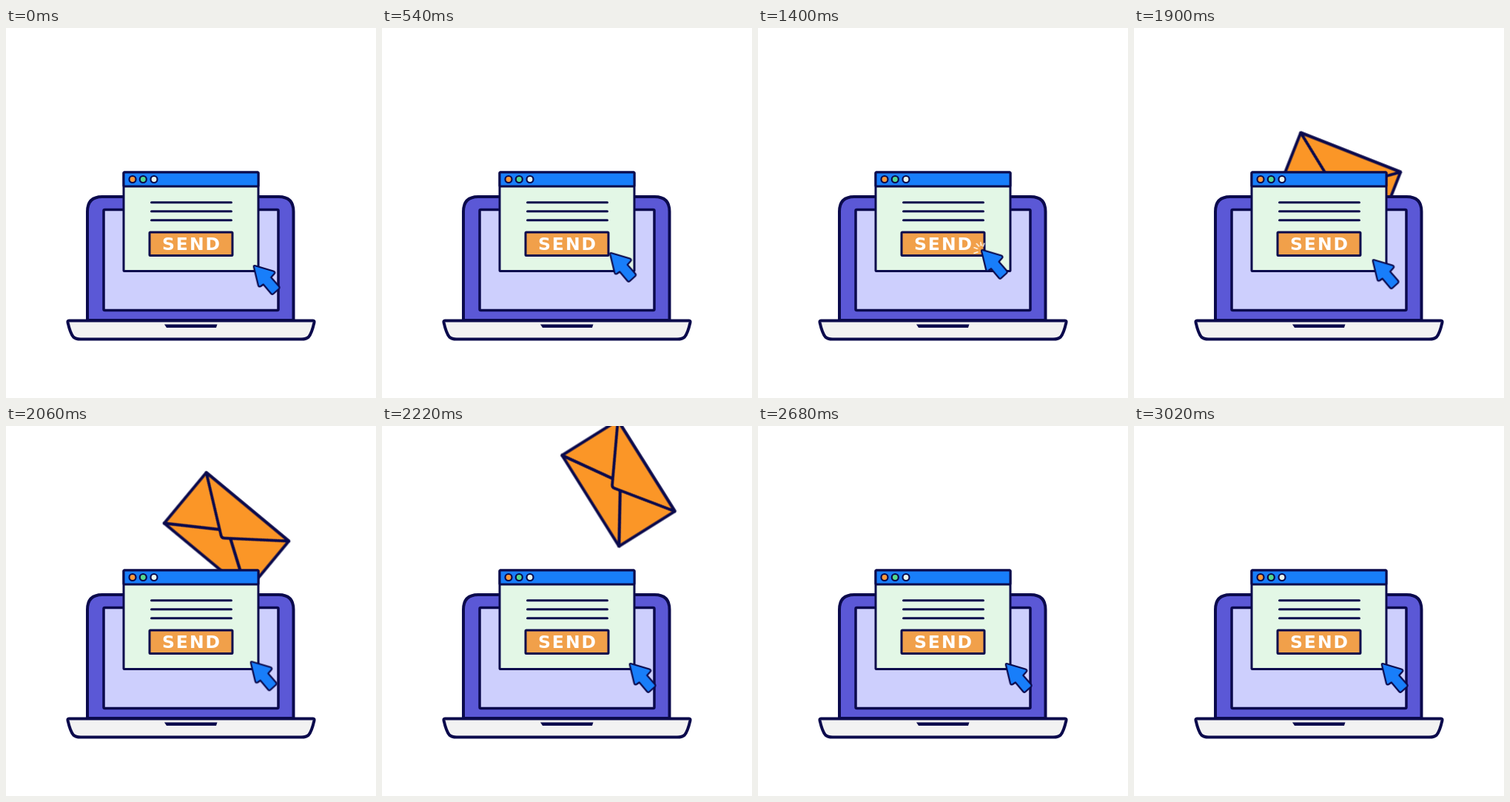
Animation of 500 by 500 pixels, one loop 3620 ms. Source, as an HTML page:

```html
<!DOCTYPE html>
<html lang="en">
<head>
<meta charset="utf-8">
<title>Send</title>
<style>
  html, body { margin: 0; width: 100%; height: 100%; overflow: hidden; background: #fff; }
  svg { display: block; width: 100%; height: 100%; }
  .line { stroke: #0b0a4c; stroke-width: 3; stroke-linejoin: round; stroke-linecap: round; }
  .thick { stroke-width: 4; }
  .thin { stroke-width: 2.2; }
  .label {
    font: 700 23.5px "DejaVu Sans", sans-serif;
    letter-spacing: 2px; fill: #fff; text-anchor: middle;
  }

  .mail, .cursor, .sparks path { animation: 3620ms linear infinite; }
  .mail { animation-name: fly; }
  .cursor { animation-name: point; }
  .sparks path {
    animation-name: burst;
    fill: none; stroke: #fffaf0; stroke-width: 1.6; stroke-dasharray: 1 3;
  }

  @keyframes fly {
    0%, 46.96% { transform: translate(249.4px, 292.5px) rotate(-1.4deg); }
    74.59%, 100% { transform: translate(384px, -120.3px) rotate(112.5deg); }
  }
  @keyframes point {
    0% { transform: translate(334.8px, 321px); animation-timing-function: cubic-bezier(.5, 0, .5, 1); }
    22.1% { transform: translate(302px, 299.8px); }
    38.67% { transform: translate(302px, 299.8px); animation-timing-function: cubic-bezier(.37, 0, .63, 1); }
    62.43%, 100% { transform: translate(334.8px, 321px); }
  }
  @keyframes burst {
    0%, 32.6% { stroke-dashoffset: 1; opacity: 0; }
    32.61% { stroke-dashoffset: 1; opacity: 1; }
    37%, 39.2% { stroke-dashoffset: 0; opacity: 1; }
    43% { stroke-dashoffset: -1; opacity: 1; }
    43.01%, 100% { stroke-dashoffset: -1; opacity: 0; }
  }
</style>
</head>
<body>
<svg viewBox="0 0 500 500">
  <!-- envelope, centred on its own origin -->
  <g class="mail">
    <rect class="line thick" x="-72.5" y="-44.5" width="145" height="89" fill="#fb9627"/>
    <path class="line thick" d="M-72.5 44.5 0 -3 72.5 44.5" fill="none"/>
    <path class="line thick" d="M-72.5 -44.5 -3 8Q0 10.5 3 8L72.5 -44.5Z" fill="#fb9627"/>
  </g>

  <!-- laptop -->
  <path class="line thick" d="M110 395V248Q110 228 130 228H368.500Q388.500 228 388.500 248V395Z" fill="#5b58d6"/>
  <rect class="line" style="stroke-width:3.500" x="132" y="245.500" width="236" height="136" rx="1.500" fill="#cdcffd"/>
  <path class="line thick" d="M85 395.500H415Q417 395.500 416.500 398Q413 413 409 417.500Q406 420.600 399 420.600H101Q94 420.600 91 417.500Q87 413 83.500 398Q83 395.500 85 395.500Z" fill="#f2f2f2"/>
  <path d="M214 400.500H285.500L284 405H217Z" fill="#0b0a4c"/>

  <!-- window -->
  <rect class="line" x="159" y="195" width="182" height="133.500" rx="1" fill="#e3f7e6"/>
  <rect class="line" x="159" y="195" width="182" height="19" rx="1" fill="#187efa"/>
  <g class="line thin">
    <circle cx="171" cy="204.500" r="4.500" fill="#fb9a3c"/>
    <circle cx="185.300" cy="204.500" r="4.500" fill="#55d98c"/>
    <circle cx="200" cy="204.500" r="4.500" fill="#e9f8ee"/>
  </g>
  <path class="line" d="M196.500 235.700H304.500M196.500 247.700H304.500M196.500 259.700H304.500" fill="none"/>
  <rect class="line" x="194" y="276" width="112" height="31.500" rx="1" fill="#f1a04a"/>
  <text class="label" x="251" y="300.400">SEND</text>

  <g class="sparks" transform="translate(301.5 299)">
    <path pathLength="1" d="M-4 3.500 -10 5.500"/>
    <path pathLength="1" d="M-4.500 -.500 -10 -2.500"/>
    <path pathLength="1" d="M-2.500 -3.500 -6.500 -8"/>
    <path pathLength="1" d="M0 -4.500 -1 -10"/>
    <path pathLength="1" d="M2.500 -3.500 4.500 -8.500"/>
  </g>

  <!-- pointer, tip at its own origin -->
  <g class="cursor">
    <path class="line thin" fill="#187efa" d="M2 .2 26.500 7.500Q30 9 27.500 11.500L23.500 16 34 28Q35.500 30 34 31.500L26.500 38.200Q25 39.500 23.500 38L13 25.500 9.500 28Q6.800 29.500 6 26.500L.1 2Q-.4 -.5 2 .2Z"/>
  </g>
</svg>
</body>
</html>
```
